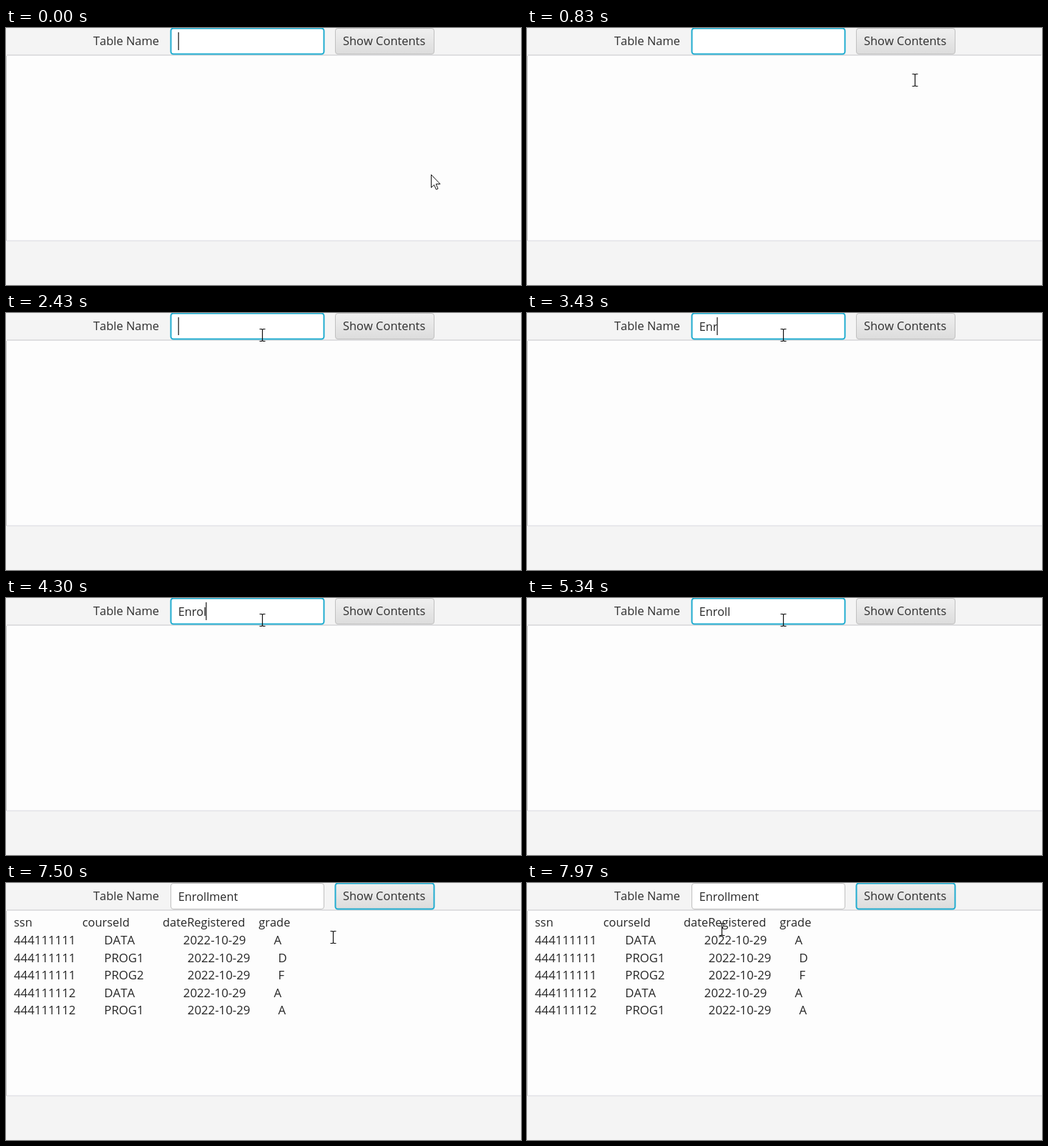
An HTML page that plays this animation: 720 by 360 pixels, repeating every 8000 ms.

```html
<!DOCTYPE html>
<html lang="en">
<head>
<meta charset="utf-8">
<title>Table contents</title>
<style>
  html, body { margin: 0; width: 100%; height: 100%; overflow: hidden; background: #f4f4f4; }
  svg { display: block; width: 720px; height: 360px; }
  text { font: 16.45px "Open Sans", "Noto Sans", sans-serif; font-kerning: none; fill: #2e2e2e; white-space: pre; }
  #rows text { font-size: 16.8px; fill: #262626; }
  #rows .head { font-size: 16.4px; }
  #typed { font-size: 16.2px; fill: #262626; }
</style>
</head>
<body>
<svg viewBox="0 0 720 360">
  <defs>
    <linearGradient id="idle" x2="0" y2="1"><stop stop-color="#f0f0f0"/><stop offset="1" stop-color="#dcdcdc"/></linearGradient>
    <linearGradient id="hover" x2="0" y2="1"><stop stop-color="#f8f8f8"/><stop offset="1" stop-color="#e6e6e6"/></linearGradient>
    <linearGradient id="press" x2="0" y2="1"><stop stop-color="#dcdcdc"/><stop offset="1" stop-color="#cacaca"/></linearGradient>
  </defs>
  <rect width="720" height="360" fill="#f4f4f4"/>
  <rect y="38" width="720" height="260" fill="#fdfdfd"/>
  <path d="M1 38H719" stroke="#c4c4c8"/>
  <path d="M.5 39V298" stroke="#c4c4c4"/>
  <path d="M1 298H720" stroke="#d8d8e0"/>
  <text x="122" y="24">Table Name</text>
  <rect id="field" x="230.5" y=".5" width="214" height="36" rx="3.5" fill="#fff"/>
  <text id="typed" x="240.8" y="25"></text>
  <rect id="caret" y="6" width="1.5" height="25" fill="#444"/>
  <rect id="button" x="460.5" y=".5" width="138" height="36" rx="3.5"/>
  <text x="471" y="24">Show Contents</text>
  <g id="rows"></g>
  <path id="arrow" d="M.5 .5V18.5L4.6 14.8L7.4 21.2L10 20.1L7.2 13.6H13Z" fill="#fff" stroke="#111"/>
  <path id="beam" d="M-3.5 -8.5H-.5L.5 -7.5L1.5 -8.5H4.5M-3.5 8.5H-.5L.5 7.5L1.5 8.5H4.5M.5 -7.5V7.5" fill="none" stroke="#111" stroke-width="1.2"/>
</svg>
<script>
const LOOP = 8000, WORD = 'Enrollment';
const KEYS = [2700, 3000, 3300, 3800, 4200, 4500, 5700, 5900, 6100, 6300];
const PRESS = 7160, RELEASE = 7240;
// pointer stops: time, x, y
const PATH = [
  [0, 594, 205], [80, 594, 205], [860, 540, 68], [1000, 500, 32], [1300, 358, 31],
  [6600, 358, 31], [6640, 362, 33], [6900, 537, 36], [6960, 537, 36],
  [7080, 540, 26], [7240, 540, 26], [7500, 457, 76], [7970, 272, 65], [LOOP, 272, 65]
];
const $ = id => document.getElementById(id);
const set = (el, attrs) => { for (const k in attrs) el.setAttribute(k, attrs[k]); };
const show = (el, on) => set(el, { visibility: on ? 'visible' : 'hidden' });

function addText(x, y, str, cls = '') {
  const el = document.createElementNS('http://www.w3.org/2000/svg', 'text');
  set(el, { x, y, class: cls });
  el.textContent = str;
  $('rows').append(el);
}

['ssn', 'courseId', 'dateRegistered', 'grade'].forEach((name, i) =>
  addText([11, 106.8, 219, 353.3][i], 61, name, 'head'));
[[1, 'DATA', 'A'], [1, 'PROG1', 'D'], [1, 'PROG2', 'F'], [2, 'DATA', 'A'], [2, 'PROG1', 'A']]
  .forEach(([id, course, grade], i) => {
    const y = Math.round(86 + 24.5 * i), shift = course.length > 4 ? 6 : 0;
    addText(11, y, '44411111' + id);
    addText(137.3, y, course);
    addText(247.8 + shift, y, '2022-10-29');
    addText(374.6 + shift, y, grade);
  });

function pointerAt(t) {
  const i = PATH.findIndex(p => p[0] > t);
  const [t0, x0, y0] = PATH[i - 1], [t1, x1, y1] = PATH[i];
  const k = (t - t0) / (t1 - t0);
  return [x0 + (x1 - x0) * k, y0 + (y1 - y0) * k];
}

function outline(el, focused) {
  set(el, { stroke: focused ? '#20acd0' : '#c0c0c0', 'stroke-width': focused ? 2 : 1 });
}

function draw(t) {
  const [x, y] = pointerAt(t);
  const overField = y < 37 && x > 230 && x < 445;
  const overButton = y < 37 && x > 460 && x < 599;
  const isBeam = t > 80 && (overField || y > 38);
  const at = `translate(${Math.round(x)} ${Math.round(y)})`;
  set($('arrow'), { transform: at });
  set($('beam'), { transform: at });
  show($('arrow'), !isBeam);
  show($('beam'), isBeam);

  const count = KEYS.filter(k => k <= t).length;
  const typed = $('typed'), text = WORD.slice(0, count);
  if (typed.textContent !== text) typed.textContent = text;
  const since = t - (count ? KEYS[count - 1] : 0);
  show($('caret'), t < PRESS && since % 1000 < 500);
  set($('caret'), { x: 240.5 + (count ? typed.getComputedTextLength() - .8 : 0) });

  const clicked = t >= PRESS;
  outline($('field'), !clicked);
  outline($('button'), clicked);
  const look = clicked && t < RELEASE ? 'press' : overButton ? 'hover' : 'idle';
  set($('button'), { fill: `url(#${look})` });
  show($('rows'), t >= RELEASE);
}

const start = performance.now();
function tick() {
  draw((performance.now() - start) % LOOP);
  requestAnimationFrame(tick);
}
tick();
</script>
</body>
</html>
```
